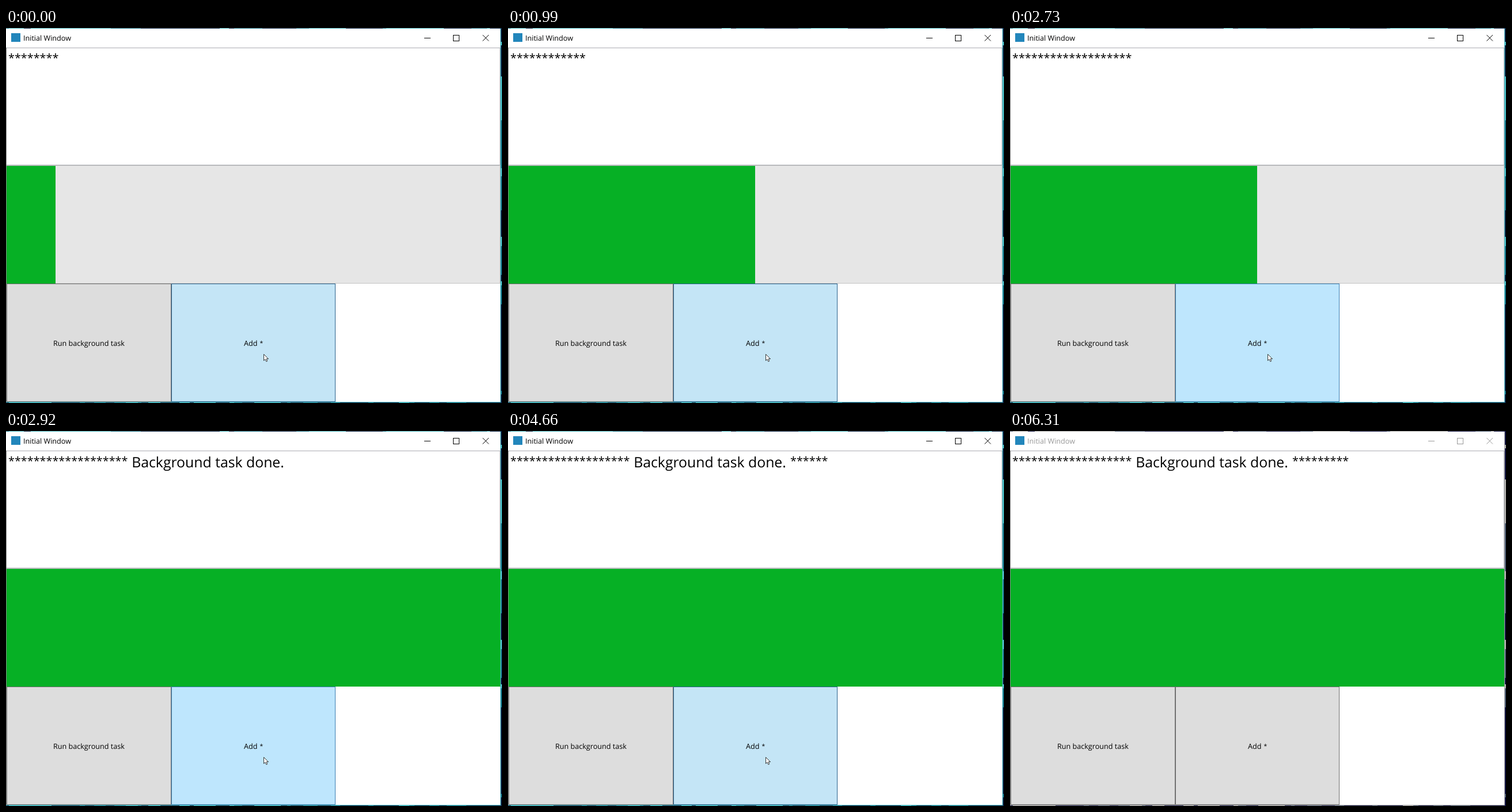
An HTML page with a canvas for the animation above (6.37 s loop, 861 px wide and 650 px high).

```html
<!DOCTYPE html>
<html lang="en">
<head>
<meta charset="utf-8">
<title>Initial Window</title>
<style>
html, body { margin: 0; width: 100%; height: 100%; overflow: hidden; background: #fff; }
canvas { display: block; width: 861px; height: 650px; }
</style>
</head>
<body>
<canvas id="stage" width="861" height="650"></canvas>
<script>
const ctx = document.getElementById('stage').getContext('2d');
const W = 861, H = 650, LOOP = 6370;
const FACE = '"Open Sans", "Noto Sans", sans-serif';

// A star appears each time the button is let go.
const RELEASES = [
  60, 400, 670, 880, 1110, 1510, 1780, 1950, 2130, 2400,
  2730, 3100, 3400, 3710, 3850, 4210, 4540, 4810, 5030, 5460
];
const START_STARS = 8;
const HALF = 790, DONE = 2920, MOVE = 5490, LEAVE = 5600, GONE = 5660, BLUR = 6310;

const LOOKS = {
  idle: ['#dddddd', '#707070'],
  hover: ['#bee6fd', '#3c7fb1'],
  pressed: ['#c4e5f6', '#2c628b']
};

function rect(x, y, w, h, color) {
  ctx.fillStyle = color;
  ctx.fillRect(x, y, w, h);
}

function frame(x, y, w, h, color) {
  ctx.strokeStyle = color;
  ctx.lineWidth = 1;
  ctx.strokeRect(x + 0.5, y + 0.5, w - 1, h - 1);
}

function line(x1, y1, x2, y2, color) {
  ctx.strokeStyle = color;
  ctx.lineWidth = 1;
  ctx.beginPath();
  ctx.moveTo(x1, y1);
  ctx.lineTo(x2, y2);
  ctx.stroke();
}

function text(str, x, y, size, color = '#000') {
  ctx.font = `${size}px ${FACE}`;
  ctx.fillStyle = color;
  ctx.fillText(str, x, y);
}

function random(seed) {
  return () => (seed = (seed * 16807) % 2147483647) / 2147483647;
}

// Calls paint(start, length, color) for random slivers along an edge.
function slivers(seed, length, longest, colors, paint) {
  const rnd = random(seed);
  for (let at = 0; at < length;) {
    const size = Math.ceil(4 + rnd() * longest);
    paint(at, size, colors[Math.floor(rnd() * colors.length)]);
    at += size;
  }
}

// Wallpaper showing around the window.
function desktop(active) {
  const colors = active
    ? ['#06203f', '#06203f', '#146f83', '#45b5bd']
    : ['#11133f', '#11133f', '#4b5a70', '#aaa9a6'];
  slivers(41, W, 22, colors, (x, w, color) => rect(x, H - 2, w, 2, color));
  slivers(77, H, 80, colors, (y, h, color) => rect(W - 2, y, 2, h, color));
  slivers(19, W, 60, colors.slice(1), (x, w, color) => rect(x, 0, w, 1, color));
}

function titleBar(active) {
  const ink = active ? '#000' : '#999';
  rect(9, 9, 16, 15, '#2286bb');
  text('Initial Window', 30, 22, 12.6, ink);
  line(726, 17.5, 737, 17.5, ink);
  frame(776, 12, 11, 11, ink);
  line(827.5, 12, 838, 22.5, ink);
  line(838, 12, 827.5, 22.5, ink);
}

function button(x, w, look) {
  const [fill, edge] = LOOKS[look];
  rect(x, 443, w, 205, fill);
  frame(x, 443, w, 205, edge);
}

function isHeld(t) {
  const i = RELEASES.findIndex(time => t < time);
  if (i < 0) return false;
  const gap = i ? RELEASES[i] - RELEASES[i - 1] : LOOP;
  return RELEASES[i] - t <= Math.min(150, gap * 0.56);
}

function pointer(t) {
  if (t >= GONE) return;
  const p = Math.min(1, Math.max(0, (t - MOVE) / (LEAVE - MOVE)));
  const shift = 257 * p * p;
  ctx.save();
  ctx.translate(Math.round(447 + shift) + 0.5, Math.round(565 + shift * 0.23) + 0.5);
  const arrow = new Path2D('M0 0V11L2.6 8.7 4.3 12.6 6.2 11.8 4.6 8H8Z');
  ctx.fillStyle = '#fff';
  ctx.fill(arrow);
  ctx.strokeStyle = '#222';
  ctx.lineWidth = 0.9;
  ctx.stroke(arrow);
  ctx.restore();
}

function starsAt(t) {
  return START_STARS + RELEASES.filter(time => time <= t).length;
}

function output(t) {
  const before = starsAt(Math.min(t, DONE));
  text('*'.repeat(before), 4, 59.2, 19.8);
  if (t < DONE) return;
  text('Background task done.', 218.2, 62.5, 24.8);
  text('*'.repeat(starsAt(t) - before), 490, 59.2, 19.8);
}

function progressBar(t) {
  const share = t < HALF ? 0.1 : t < DONE ? 0.5 : 1;
  rect(1, 238, 857, 205, '#e6e6e6');
  frame(1, 238, 857, 205, '#c4c4c4');
  rect(1, 239, Math.floor(857 * share), 204, '#06b025');
}

function draw(t) {
  const active = t < BLUR;
  const edge = active ? '#58c0c8' : '#aaaaaa';

  desktop(active);
  rect(0, 1, 859, 648, edge);
  rect(0, 1, 858, 647, '#fff');
  titleBar(active);
  frame(0, 34, 858, 204, '#abadb3');
  output(t);
  progressBar(t);
  rect(0, 34, 1, 614, '#808080');

  button(1, 286, 'idle');
  button(287, 285, t >= LEAVE ? 'idle' : isHeld(t) ? 'pressed' : 'hover');
  text('Run background task', 82, 551, 12.6);
  text('Add', 413, 551, 12.6);
  text('*', 440.4, 550, 10.4);
  pointer(t);
}

ctx.textRendering = 'geometricPrecision';
const start = performance.now();
function tick() {
  draw((performance.now() - start) % LOOP);
  requestAnimationFrame(tick);
}
tick();
</script>
</body>
</html>
```
